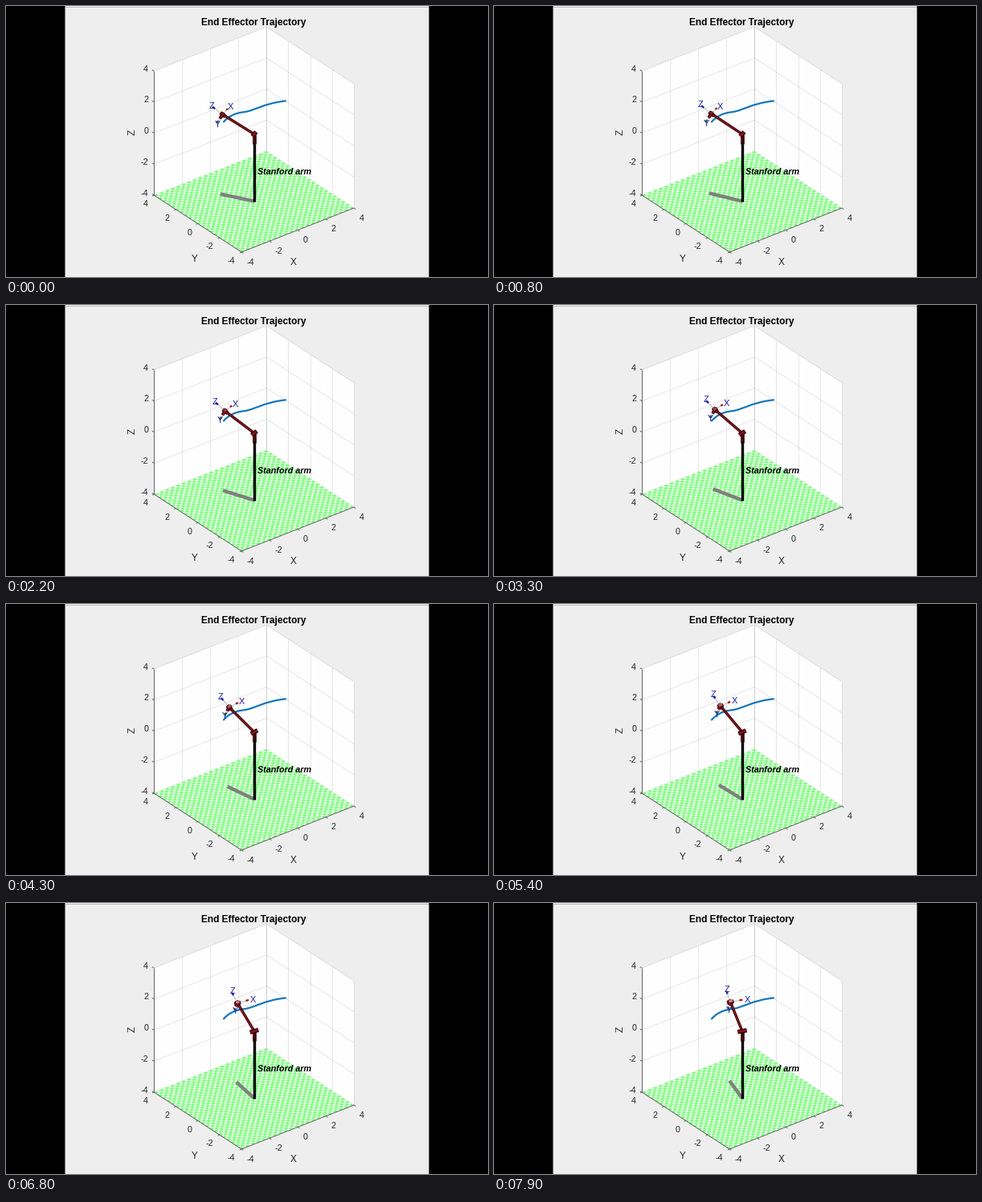
Write a matplotlib script that moves like this. It is 600 px wide and 338 px high and loops after 8000 ms.

```python
import matplotlib.pyplot as plt
import numpy as np
from matplotlib.animation import FuncAnimation
from matplotlib.patches import PathPatch, Polygon, Rectangle
from matplotlib.path import Path

W, H, DPI = 600, 338, 100
PT = 72 / DPI
FRAMES, INTERVAL = 80, 100

plt.rcParams["font.family"] = "Liberation Sans"
fig = plt.figure(figsize=(W / DPI, H / DPI), dpi=DPI, facecolor="#efeeef")
ax = fig.add_axes([0, 0, 1, 1])
ax.set(xlim=(0, W), ylim=(H, 0))
ax.axis("off")

ORIGIN = np.array([308.7, 166.5])
BASIS = np.array([[17.5, -6.87], [-13.62, -8.87], [0, -19.37]])
INK = "#262626"
AXIS = "#5a5a5a"
NAVY = "#1c1c9c"


def project(p):
    """Orthographic view of 3D points, in stage pixels."""
    return ORIGIN + np.asarray(p, float) @ BASIS


def line(pts, color, width, z=2, **kw):
    pts = np.asarray(pts)
    kw.setdefault("solid_capstyle", "butt")
    return ax.plot(pts[:, 0], pts[:, 1], color=color, lw=width * PT, zorder=z, **kw)[0]


def label(x, y, s, size=10.8, color=INK, ha="center", z=9, **kw):
    """Text whose capitals are centred on y."""
    return ax.text(x, y + 0.36 * size, s, fontsize=size * PT, color=color,
                   ha=ha, va="baseline", zorder=z, **kw)


def draw_floor(lo, hi, n=41):
    ax.add_patch(Polygon(project([(lo, lo, lo), (hi, lo, lo), (hi, hi, lo), (lo, hi, lo)]),
                         fc="#e2fde2", ec="none", zorder=0.8))
    tile = (hi - lo) / n
    verts, codes = [], []
    for i in range(n):
        for j in range(i % 2, n, 2):
            x, y = lo + i * tile, lo + j * tile
            quad = [(x, y, lo), (x + tile, y, lo), (x + tile, y + tile, lo),
                    (x, y + tile, lo), (x, y, lo)]
            verts.extend(project(quad))
            codes += [Path.MOVETO] + [Path.LINETO] * 3 + [Path.CLOSEPOLY]
    ax.add_patch(PathPatch(Path(verts, codes), fc="#80fb80", ec="none", zorder=1))


def draw_box():
    lo, hi = -4, 4
    walls = [
        [(lo, hi, lo), (hi, hi, lo), (hi, hi, hi), (lo, hi, hi)],
        [(hi, hi, lo), (hi, lo, lo), (hi, lo, hi), (hi, hi, hi)],
    ]
    for wall in walls:
        ax.add_patch(Polygon(project(wall), fc="#fefefe", ec="none", zorder=0))
    for v in range(lo, hi + 1, 2):
        for seg in ([(v, hi, lo), (v, hi, hi)], [(hi, v, lo), (hi, v, hi)],
                    [(lo, hi, v), (hi, hi, v)], [(hi, hi, v), (hi, lo, v)]):
            line(project(seg), "black", 0.9, 0.5, alpha=0.1)
    draw_floor(lo, hi)
    for seg in ([(lo, hi, lo), (lo, hi, hi)], [(lo, hi, lo), (lo, lo, lo)],
                [(lo, lo, lo), (hi, lo, lo)]):
        line(project(seg), AXIS, 0.9)


def draw_ticks():
    for v in range(-4, 5, 2):
        x, y, z = project([(v, -4, -4), (-4, v, -4), (-4, 4, v)])
        for p, d in ((x, (2.2, 1.5)), (y, (-2.2, 0.9)), (z, (-2.4, -1.4))):
            line([p, p + d], AXIS, 0.9)
        label(x[0] + 6.6, x[1] + 11.7, str(v), ha="left")
        label(y[0] - 7.6, y[1] + 10.3, str(v), ha="right")
        label(z[0] - 7, z[1] - 3.3, str(v), ha="right")
    label(358, 319, "X", 11.9)
    label(235, 315, "Y", 11.9)
    ax.text(163.2, 157.5, "Z", fontsize=11.9 * PT, color=INK, rotation=90,
            ha="right", va="center", zorder=9)


def draw_path():
    pts = [(271, 144.5), (276, 138.5), (284, 133.5), (296, 132.3),
           (310, 130.5), (320, 121.5), (348, 118.4)]
    curve = Path(pts, [Path.MOVETO] + [Path.CURVE4] * 6)
    ax.add_patch(PathPatch(curve, fc="none", ec="#1276ba", lw=2.2 * PT,
                           capstyle="round", zorder=3))


draw_box()
draw_ticks()
draw_path()
line([(73, 0.5), (527, 0.5)], "#bdbdbd", 1)
for left, width in ((0, 73.5), (526.5, 73.5)):
    ax.add_patch(Rectangle((left, 0), width, H, fc="black", ec="none",
                           zorder=10, snap=False))
label(308.7, 19.3, "End Effector Trajectory", 11.9, "black", weight="bold")
label(313.3, 206.5, "Stanford arm", 10.8, "black", "left",
      weight="bold", style="italic")

# Fixed column
BASE = np.array([309, 243.5])
SHOULDER = np.array([309, 159.8])
line([BASE, (309, 165)], "black", 3.4, 5)
line([(309, 171.5), SHOULDER], "#2a0206", 4.6, 5.1)
line([(308.4, 171), SHOULDER], "#5c0b13", 1.4, 5.2)

NONE = [(0, 0), (0, 0)]


def tube(width, z, dark="#2c0307", lit="#8a131e"):
    """A shaded cylinder: dark body with a lit core."""
    return [line(NONE, dark, width, z), line(NONE, lit, width * 0.5, z + 0.01)]


shadow = line(NONE, "#808080", 4.4, 4)
arm = tube(3.4, 6)
joint = tube(5.4, 6.2)
wrist = [tube(4.6, 6.4), tube(4.6, 6.5), tube(4, 6.6)]
glint = line(NONE, "#cf8585", 3.4, 6.8, solid_capstyle="round")
HEADS = ("#a3201a", "#1d5a2c", "#2020a8")
stems = [line(NONE, "#b4b8ae", 0.9, 6.3) for _ in HEADS]
heads = [line(NONE, c, 2.4, 7) for c in HEADS]
names = [label(0, 0, s, 11, NAVY) for s in "XYZ"]
REACH = (0.95, 0.8, 0.85)


def place(ln, a, b):
    ln.set_data([a[0], b[0]], [a[1], b[1]])


def place_tube(parts, a, b):
    for part in parts:
        place(part, a, b)


def update(i):
    t = i * INTERVAL / 1000
    theta = np.radians(119.4 - 3.33 * t - 0.3316 * t * t)
    c, s = np.cos(theta), np.sin(theta)
    out = np.array([c, s, 0]) @ BASIS
    up = BASIS[2]

    hand = BASE + 1.92 * out - (0, 99.8)
    xdir = np.array([s, -c, 0]) @ BASIS
    ydir = 0.5 * out - 0.866 * up
    zdir = 0.866 * out + 0.5 * up

    place(shadow, BASE, BASE + 2.06 * out)
    place_tube(arm, SHOULDER, hand)
    place_tube(joint, SHOULDER - 0.27 * xdir, SHOULDER + 0.27 * xdir)
    place_tube(wrist[0], hand - 0.2 * zdir, hand + 0.16 * zdir)
    place_tube(wrist[1], hand - 0.2 * xdir, hand + 0.2 * xdir)
    place_tube(wrist[2], hand, hand + 0.35 * ydir)
    place(glint, hand + 0.06 * zdir, hand + 0.06 * zdir + 0.08 * xdir)
    glint.set_alpha(min(1, 0.1 + t / 8))

    for d, r, stem, head, name in zip((xdir, ydir, zdir), REACH, stems, heads, names):
        place(stem, hand, hand + 0.7 * d)
        place(head, hand + 0.54 * d, hand + 0.72 * d)
        x, y = hand + r * d
        name.set_position((x + 1.4, y + 0.36 * 11))
    return [shadow, glint, *arm, *joint, *sum(wrist, []), *stems, *heads, *names]


anim = FuncAnimation(fig, update, frames=FRAMES, interval=INTERVAL,
                     repeat=True, repeat_delay=0, blit=False)
plt.show()
```
